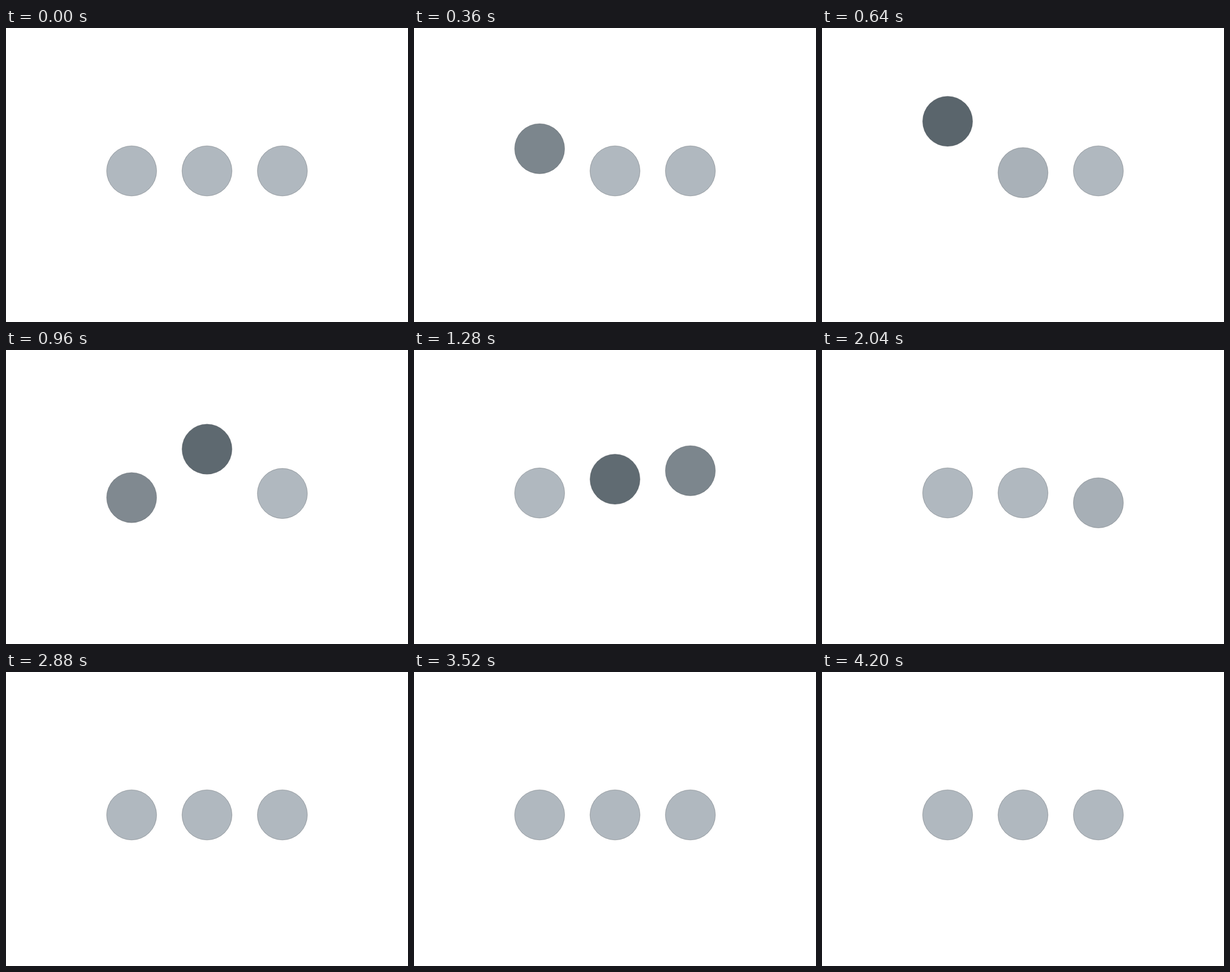
An HTML page with a canvas that plays this animation: 640x467 px, repeating every 4400 ms.

```html
<!DOCTYPE html>
<html lang="en">
<head>
<meta charset="utf-8">
<title>Bouncing dots</title>
<style>
  html, body { margin: 0; width: 100%; height: 100%; overflow: hidden; background: #fff; }
  canvas { display: block; }
</style>
</head>
<body>
<canvas id="stage" width="640" height="467"></canvas>
<script>
const ctx = document.getElementById('stage').getContext('2d');
const LOOP = 4400, STEP = 40;
const REST_Y = 227, RADIUS = 40;
const LIGHT = [176, 184, 191], DARK = [90, 101, 108];

// Each dot dips, jumps, sinks below its rest line and settles.
const dots = [
  { x: 200, start: 0, dip: 4, sink: 13, sinkAt: 1025, end: 1300 },
  { x: 320, start: 460, dip: 5, sink: 24, sinkAt: 1000, end: 1335 },
  { x: 440, start: 920, dip: 4, sink: 18, sinkAt: 1055, end: 1340 }
];

const ease = p => (1 - Math.cos(Math.PI * p)) / 2;

// Eased value at time t through [time, value] keys.
function track(keys, t) {
  if (t <= keys[0][0]) return keys[0][1];
  for (let i = 1; i < keys.length; i++) {
    const [t0, v0] = keys[i - 1], [t1, v1] = keys[i];
    if (t < t1) return v0 + (v1 - v0) * ease((t - t0) / (t1 - t0));
  }
  return keys[keys.length - 1][1];
}

const shadeKeys = [[94, 0], [566, 1], [735, 1], [1225, 0]];

function drawDot(dot, time) {
  const t = time - dot.start;
  const y = REST_Y + track([
    [0, 0], [130, dot.dip], [610, -80], [dot.sinkAt, dot.sink], [dot.end, 0]
  ], t);
  const shade = track(shadeKeys, t);
  const rgb = LIGHT.map((c, i) => Math.round(c + (DARK[i] - c) * shade));
  ctx.beginPath();
  ctx.arc(dot.x, y, RADIUS - 0.2, 0, Math.PI * 2);
  ctx.fillStyle = `rgb(${rgb})`;
  ctx.fill();
  ctx.lineWidth = 0.5;
  ctx.strokeStyle = 'rgba(40, 48, 54, 0.6)';
  ctx.stroke();
}

function draw(now) {
  const time = Math.floor((now % LOOP) / STEP) * STEP;
  ctx.fillStyle = '#fff';
  ctx.fillRect(0, 0, 640, 467);
  for (const dot of dots) drawDot(dot, time);
}

const begin = performance.now();
function tick() {
  draw(performance.now() - begin);
  requestAnimationFrame(tick);
}
tick();
</script>
</body>
</html>
```
